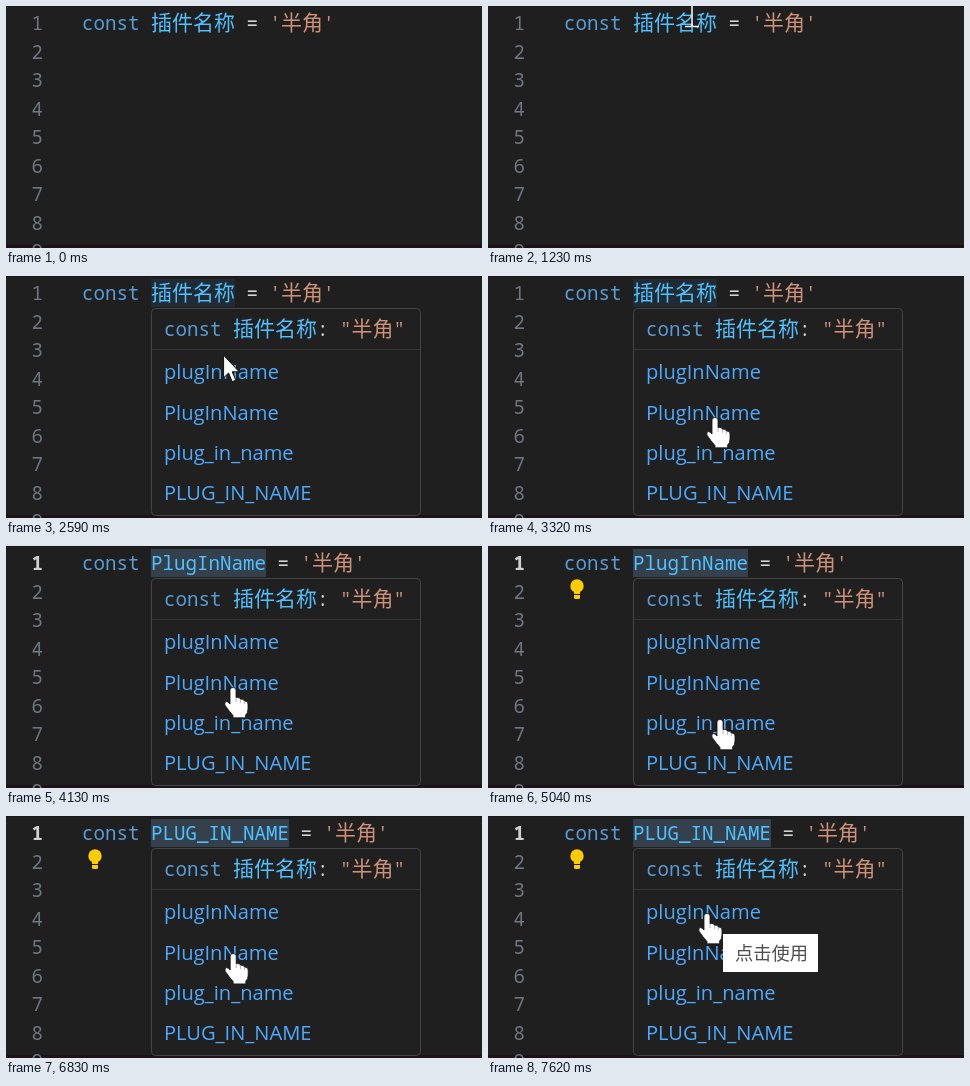
Animation, 476 px wide and 242 px high, one loop 8 s. Source, as an HTML page:

```html
<!DOCTYPE html>
<html lang="zh">
<head>
<meta charset="utf-8">
<style>
html, body { margin: 0; width: 100%; height: 100%; overflow: hidden; background: #1f1f1f; }
svg { display: block; }
text { white-space: pre; }
.mono { font: 19.17px "Noto Sans Mono", monospace; }
.cjk { font: 21px "Noto Sans CJK SC", "Noto Sans CJK", sans-serif; }
.link { font: 20.1px "Open Sans", sans-serif; fill: #4daafc; }
.tip { font: 18.3px "Noto Sans CJK SC", "Noto Sans CJK", sans-serif; fill: #505050; }
.num { fill: #6e7681; text-anchor: end; }
.num.on { fill: #d0d0d0; font-weight: 700; }
.key { fill: #569cd6; }
.var { fill: #4fc1ff; }
.op { fill: #d4d4d4; }
.str { fill: #ce9178; }
</style>
</head>
<body>
<svg width="476" height="242" viewBox="0 0 476 242">
  <rect width="476" height="242" fill="#1f1f1f"/>
  <rect width="476" height="1" fill="#181818"/>
  <rect y="239" width="476" height="3" fill="#1c1218"/>
  <g id="nums"></g>
  <rect id="mark" x="145" y="3" height="28"/>
  <text class="mono" x="76" y="24"><tspan class="key">const </tspan><tspan id="name" class="var"></tspan><tspan class="op"> = </tspan><tspan class="str">'</tspan><tspan class="str cjk">半角</tspan><tspan class="str">'</tspan></text>
  <g id="bulb" fill="#ffcc00">
    <circle cx="89" cy="40" r="6.7"/>
    <path d="M86 44H92V51.5Q92 53 90.5 53H87.5Q86 53 86 51.5Z"/>
    <path d="M86 48.5H92" stroke="#1f1f1f"/>
  </g>
  <rect id="edge" x="146" y="31" width="268" height="1" fill="#2c2c2c"/>
  <g id="popup">
    <rect x="145.5" y="32.5" width="269" height="207" rx="4" fill="#202020" stroke="#454545"/>
    <path d="M146 73.5H414" stroke="#363636"/>
    <text class="mono" x="158" y="60"><tspan class="key">const </tspan><tspan class="var cjk">插件名称</tspan><tspan class="op">: </tspan><tspan class="str">"</tspan><tspan class="str cjk">半角</tspan><tspan class="str">"</tspan></text>
    <g id="links"></g>
  </g>
  <g id="tip">
    <rect x="16" y="20" width="95" height="38" fill="#fff"/>
    <text class="tip" x="28" y="45.5">点击使用</text>
  </g>
  <g id="cursor">
    <path id="beam" d="M-7 12.5H-2Q0 12.5 0 10.5V-10.5Q0 -12.5 -2 -12.5H-7M7 12.5H2Q0 12.5 0 10.5M7 -12.5H2Q0 -12.5 0 -10.5" fill="none" stroke="#f0f0f0" stroke-width="1.6"/>
    <path id="arrow" d="M0 0V22.5L5 17.8L8.6 26.5L12.2 25L8.6 16.6H15.5Z" fill="#fff" stroke="#111"/>
    <g id="hand">
      <path d="M-3 2Q-3 -.5 0 -.5Q3 -.5 3 2V9.5Q7 8.8 7.4 11.2Q11 10.5 11.3 13Q15 12.7 15 16V21Q15 25 12.6 27V29.8H0V27.5Q-4 23 -8 17.2Q-9 14 -6.5 13.5Q-5 13.5 -3 16Z" fill="#fff" stroke="#111" stroke-width=".8"/>
      <path d="M3 10V14M7.4 11.5V15M11.3 13.3V16" stroke="#999" stroke-width=".7"/>
    </g>
  </g>
</svg>
<script>
const LOOP = 8000;
const $ = id => document.getElementById(id);
const show = (id, on) => $(id).setAttribute('visibility', on ? 'visible' : 'hidden');
const within = (t, a, b) => t >= a && t < b;

function addText(parent, cls, x, y, str) {
  const el = document.createElementNS('http://www.w3.org/2000/svg', 'text');
  el.setAttribute('class', cls);
  el.setAttribute('x', x);
  el.setAttribute('y', y);
  el.textContent = str;
  $(parent).append(el);
  return el;
}

const nums = [];
for (let i = 0; i < 9; i++) nums.push(addText('nums', 'mono num', 37, 24 + 28.5 * i, i + 1));
['plugInName', 'PlugInName', 'plug_in_name', 'PLUG_IN_NAME']
  .forEach((s, i) => addText('links', 'link', 158, 103.3 + 40.2 * i, s));

// start, last step, steps, x, y, ease-out power
const START = [428, 232];
const MOVES = [
  [570, 1230, 10, 204, 8, 1.7],
  [2290, 2730, 7, 220, 92, 1.5],
  [3030, 3320, 5, 227, 142, 1.5],
  [4810, 5030, 4, 232, 174, 1.3],
  [5530, 5900, 6, 241, 206, 0.8],
  [6680, 7120, 7, 219, 98, 1.77]
];

// time, variable name
const NAMES = [
  [0, '插件名称'],
  [3990, 'PlugInName'],
  [5180, 'plug_in_name'],
  [6110, 'PLUG_IN_NAME']
];

function cursorAt(t) {
  let [x, y] = START;
  for (const [a, b, n, tx, ty, p] of MOVES) {
    if (t < a) break;
    const step = Math.min(n, 1 + Math.floor((t - a) / (b - a) * (n - 1) + 0.01));
    const k = 1 - (1 - step / n) ** p;
    x += (tx - x) * k;
    y += (ty - y) * k;
  }
  return [x, y];
}

function draw(t) {
  const name = NAMES.filter(n => t >= n[0]).pop()[1];
  const edited = t >= NAMES[1][0];
  if ($('name').textContent !== name) {
    $('name').textContent = name;
    $('name').setAttribute('class', edited ? 'var' : 'var cjk');
  }

  // the word mark grows stronger one step after each edit
  const fresh = within(t, 3990, 4130) || within(t, 5180, 5250) || within(t, 6110, 6180);
  show('mark', t >= 1440);
  $('mark').setAttribute('width', edited ? name.length * 11.5 : 84);
  $('mark').setAttribute('fill', edited && !fresh ? '#34414d' : '#212b33');
  nums[0].classList.toggle('on', t >= 4130);

  show('bulb', t >= 4740);
  show('edge', within(t, 1510, 1860));
  show('popup', t >= 1860);

  const [x, y] = cursorAt(t);
  const pos = `translate(${x.toFixed(1)} ${y.toFixed(1)})`;
  $('cursor').setAttribute('transform', pos);
  $('tip').setAttribute('transform', pos);
  show('tip', within(t, 3880, 4060) || t >= 7620);
  const beam = t < 2290 || (t < 2880 && y < 31);
  show('beam', t >= 570 && beam);
  show('arrow', t < 2880 && !beam);
  show('hand', t >= 2880);
}

const begin = performance.now();
function tick() {
  draw((performance.now() - begin) % LOOP);
  requestAnimationFrame(tick);
}
draw(0);
requestAnimationFrame(tick);
</script>
</body>
</html>
```
